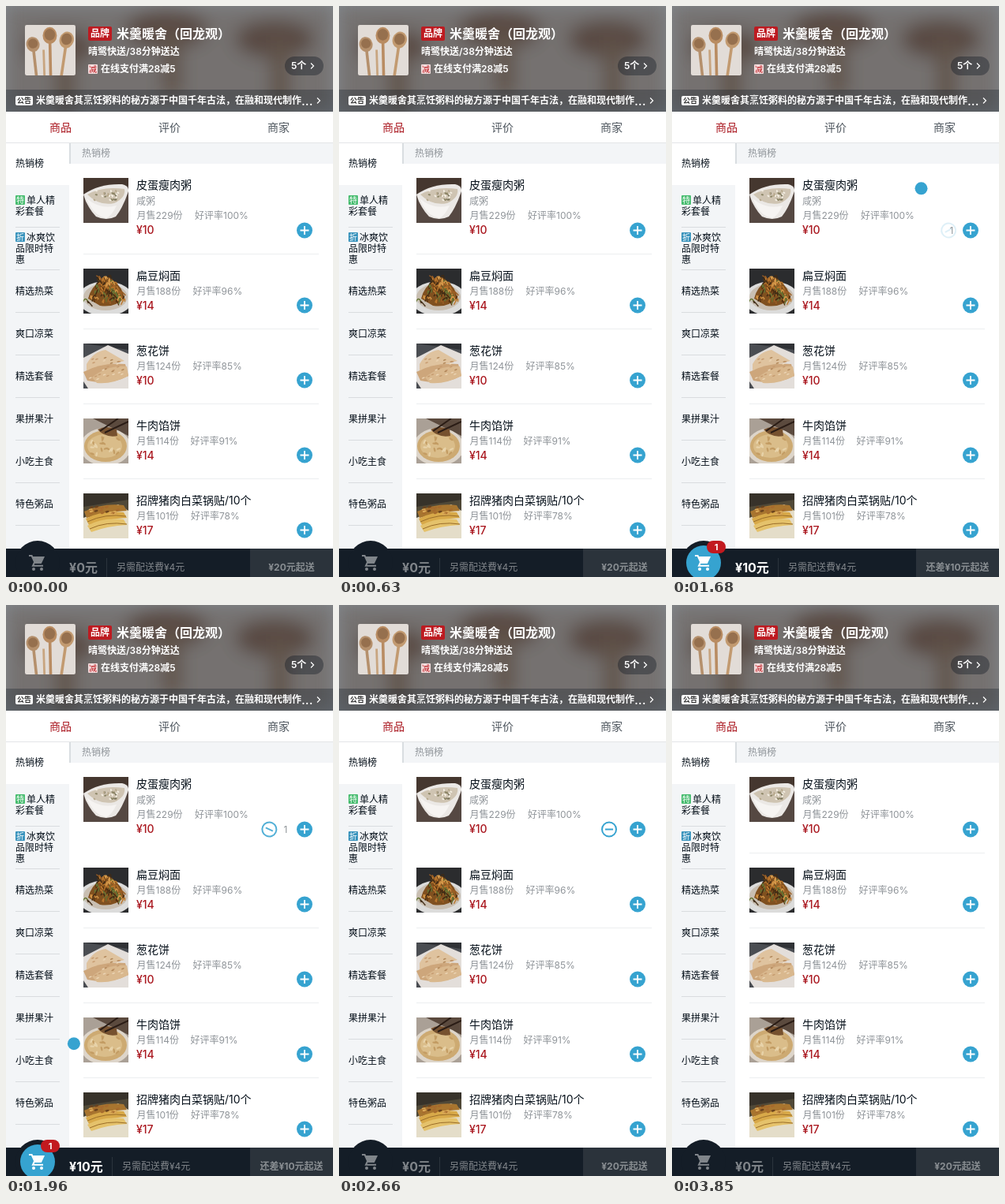
Recreate the animation shown at these times as an HTML page. Size 414 by 724 pixels, loop 3920 ms.

```html
<!DOCTYPE html>
<html lang="zh-CN">
<head>
<meta charset="utf-8">
<style>
  html, body { margin: 0; width: 100%; height: 100%; overflow: hidden; background: #fff; }
  svg { display: block; width: 414px; height: 724px; font-family: Inter, "Noto Sans CJK SC", "Noto Sans CJK", sans-serif; }
</style>
</head>
<body>
<svg id="stage" viewBox="0 0 414 724"></svg>
<script>
const BLUE = '#36a3d0', RED = '#aa1820', TAG_RED = '#bd1a20', INK = '#07111b', GREY = '#8f9499', DIM = '#80858a';
const LOOP = 3920, STEP = 70, ADD = 1610, REMOVE = 2660, DURATION = 400, RENDER_DELAY = 6;

// y is the vertical centre of the line
const text = (x, y, size, fill, content, weight = 400, anchor = 'start') =>
  `<text x="${x}" y="${y + size * .37}" font-size="${size}" fill="${fill}" font-weight="${weight}" text-anchor="${anchor}">${content}</text>`;
const rect = (x, y, w, h, fill, r = 0) =>
  `<rect x="${x}" y="${y}" width="${w}" height="${h}" rx="${r}" fill="${fill}"/>`;
const ellipse = (x, y, rx, ry, fill, turn = 0) =>
  `<ellipse cx="${x}" cy="${y}" rx="${rx}" ry="${ry}" fill="${fill}" transform="rotate(${turn} ${x} ${y})"/>`;
const shape = (d, fill) => `<path d="${d}" fill="${fill}"/>`;
const stroke = (d, color, width = 1) => `<path d="${d}" fill="none" stroke="${color}" stroke-width="${width}"/>`;
const chevron = (x, y) => stroke(`M${x - 2} ${y - 3.5}l3.5 3.5l-3.5 3.5`, '#fff', 1.2);
const tag = (x, y, fill, content, color = '#fff') =>
  rect(x, y, 12, 12, fill, 1) + text(x + 6, y + 6, 10, color, content, 500, 'middle');

let seed = 7;
const random = () => (seed = seed * 16807 % 2147483647) / 2147483647;
const scatter = (count, draw) => Array.from({ length: count }, draw).join('');
const pick = list => list[Math.floor(random() * list.length)];

// Pictures use a 57 x 57 box
const photo = (x, y, size, content) =>
  `<svg x="${x}" y="${y}" width="${size}" height="${size}" viewBox="0 0 57 57">${content}</svg>`;

const spoon = (x, y, rx, ry, turn, endX, color) =>
  stroke(`M${x} ${y}L${endX} 58`, color, 3.2) + ellipse(x, y, rx, ry, color, turn) +
  ellipse(x, y - 1, rx - 2, ry - 3, '#96704e', turn);
const spoons = spoon(9, 22, 7.5, 8.5, -12, 13, '#b5906c') + stroke('M21 28L22 58', '#c8a580', 2.5) +
  spoon(28, 12, 8, 9.5, 0, 29, '#b98c62') + spoon(47, 17, 8, 9.5, 18, 41, '#c29a70');

const porridge = () => rect(0, 0, 57, 57, '#554842') + shape('M0 0H57V10L0 20Z', '#45372f') +
  shape('M0 21Q20 7 49 8Q58 10 57 17Q50 38 41 49Q29 55 16 49Q4 36 0 21Z', '#ebe8e5') +
  shape('M5 21Q24 10 52 14Q54 25 39 32Q20 36 5 21Z', '#cfc4b2') +
  scatter(28, () => ellipse(14 + random() * 30, 16 + random() * 13, 1.7, 1, pick(['#8b8465', '#b6a88c', '#f4efe3', '#77725a']), random() * 180)) +
  shape('M4 26Q22 41 42 35Q36 48 29 51Q13 49 4 26Z', '#f6f4f2');

const noodles = () => rect(0, 0, 57, 57, '#2b2c2e') + ellipse(28, 38, 35, 22, '#dcdcdb') + ellipse(28, 36, 28, 17, '#c9bfb2') +
  shape('M6 38Q9 24 22 15Q30 6 38 15Q49 23 52 37Q40 50 21 47Z', '#80501f') +
  scatter(80, () => {
    const y = 13 + random() * 31, x = 29 + (random() - .5) * (y + 5);
    return stroke(`M${x} ${y}q${random() * 10 - 5} ${-5 - random() * 5} ${random() * 14 - 7} ${random() * 10 - 5}`,
      pick(['#bb782e', '#d79b4c', '#54300f', '#9c5f25', '#3f2a14', '#667333']), 1.4);
  });

const flatbread = () => rect(0, 0, 57, 57, '#4a4d52') + shape('M0 0H57V8Z', '#303236') +
  shape('M0 18L31 2L57 13V57H6L0 48Z', '#e3deda') +
  shape('M4 26Q13 10 28 8L52 22Q33 27 4 34Z', '#dfc39f') +
  shape('M0 36Q24 23 53 26L57 41Q34 53 5 47Z', '#cda67b') +
  shape('M11 43Q30 27 55 29L57 41Q36 52 17 50Z', '#d9b88e') +
  scatter(26, () => ellipse(8 + random() * 42, 18 + random() * 28, 2, .8, pick(['#b1875a', '#c69b70', '#ebd4b4']), -20));

const meatPie = () => rect(0, 0, 57, 57, '#aaa096') + shape('M12 0H57V22Z', '#5b4a3e') +
  ellipse(28, 36, 32, 24, '#ddd5ca') + ellipse(28, 35, 27, 20, '#cdaa72') + ellipse(27, 35, 22, 15, '#dabd8a') +
  shape('M18 14Q29 8 42 14L43 22Q28 25 18 14Z', '#76512f') +
  scatter(20, () => ellipse(10 + random() * 36, 25 + random() * 21, 3, 1.2, pick(['#c39c63', '#e8d3aa']), random() * 180)) +
  stroke('M21 16L44 0M27 18L57 4', '#2a1c15', 2);

const dumplings = () => rect(0, 0, 57, 57, '#504938') + shape('M0 0H57V8L0 17Z', '#37322a') +
  shape('M0 31L44 14L57 22V57H0Z', '#e4ddc9') +
  [0, 1, 2].map(i => shape(`M${1 + i * 2} ${23 + i * 9}Q24 ${12 + i * 9} 51 ${15 + i * 9}L55 ${22 + i * 9}Q31 ${23 + i * 9} ${4 + i * 3} ${31 + i * 9}Z`,
    ['#a8752f', '#d8a949', '#e5c26b'][i])).join('') +
  scatter(22, () => ellipse(9 + random() * 38, 17 + random() * 10, 2.6, 1.3, pick(['#6b431e', '#a66a2d', '#d9a856']), -15)) +
  stroke('M5 36Q28 25 54 29M8 45Q29 35 55 39', '#9a6d2a', 1);

const foods = [
  { y: 218, name: '皮蛋瘦肉粥', note: '咸粥', sold: 229, rating: 100, ratingX: 239, price: 10, picture: porridge },
  { y: 333, name: '扁豆焖面', sold: 188, rating: 96, ratingX: 236.5, price: 14, picture: noodles },
  { y: 428, name: '葱花饼', sold: 124, rating: 85, ratingX: 236.5, price: 10, picture: flatbread },
  { y: 523, name: '牛肉馅饼', sold: 114, rating: 91, ratingX: 233.5, price: 14, picture: meatPie },
  { y: 618, name: '招牌猪肉白菜锅贴/10个', sold: 101, rating: 78, ratingX: 234, price: 17, picture: dumplings },
];

function header() {
  const blots = [[68, 52, 45, 22], [203, 30, 52, 24], [340, 42, 50, 24]]
    .map(([x, y, rx, ry]) => ellipse(x, y, rx, ry, '#594a42') + rect(x - 5, y, 24, 84, '#61534a')).join('');
  return `<defs><filter id="blur" x="-20%" y="-40%" width="140%" height="180%"><feGaussianBlur stdDeviation="11"/></filter>
      <clipPath id="top">${rect(0, 0, 414, 134)}</clipPath></defs>
    <g clip-path="url(#top)">${rect(0, 0, 414, 134, '#83888d')}
    <g filter="url(#blur)">${rect(0, 0, 414, 134, '#747170')}${blots}</g>
    ${rect(0, 106, 414, 28, 'rgba(7,17,27,.28)')}</g>` +
    photo(24, 24, 64, rect(0, 0, 57, 57, '#e2dcd7', 2) + spoons) +
    rect(104, 26, 30, 18, TAG_RED, 2) + text(119, 35, 12, '#fff', '品牌', 700, 'middle') +
    text(140, 35, 16, '#fff', '米羹暖舍（回龙观）', 700) +
    text(104, 58, 12, '#fff', '晴鹭快送/38分钟送达', 600) +
    tag(104, 74, '#f3dcdc', '减', TAG_RED) + text(120, 80, 12, '#fff', '在线支付满28减5', 600) +
    rect(353, 64, 49, 24, 'rgba(7,17,27,.35)', 12) + text(361, 76, 12, '#fff', '5个', 600) + chevron(388, 76) +
    rect(12, 114, 22, 12, '#fff', 2) + text(23, 120, 9, '#333', '公告', 700, 'middle') +
    text(38, 120, 12, '#fff', '米羹暖舍其烹饪粥料的秘方源于中国千年古法，在融和现代制作', 600) +
    text(374, 120, 16, '#fff', '...', 500) + chevron(396, 120) +
    text(69, 154, 14, RED, '商品', 400, 'middle') + text(207, 154, 14, '#4d555d', '评价', 400, 'middle') +
    text(345, 154, 14, '#4d555d', '商家', 400, 'middle') + rect(0, 173, 414, 1, '#e3e5e7');
}

function menu() {
  const labels = ['精选热菜', '爽口凉菜', '精选套餐', '果拼果汁', '小吃主食', '特色粥品'];
  let out = rect(0, 174, 80, 514, '#f3f5f7') + rect(0, 174, 80, 53, '#fff') + text(12, 200, 12, INK, '热销榜') +
    tag(12, 240, '#48bd70', '特') + text(26, 247, 12, INK, '单人精') + text(12, 261, 12, INK, '彩套餐') +
    tag(12, 287, '#3a94bd', '折') + text(26, 294, 12, INK, '冰爽饮') + text(12, 308, 12, INK, '品限时特') + text(12, 322, 12, INK, '惠');
  labels.forEach((label, i) => out += text(12, 362 + i * 54, 12, INK, label));
  for (let i = 0; i < 8; i++) out += rect(12, 280 + i * 54, 56, 1, '#d9dcdf');
  return out;
}

function food({ y, name, note, sold, rating, ratingX, price, picture }, index) {
  const shift = note ? 19 : 0, plusY = y + 47 + shift + (note ? .5 : -.5);
  return photo(98, y, 57, picture()) + text(165, y + 9, 14, INK, name) +
    (note ? text(165, y + 30, 12, GREY, note) : '') +
    text(165.5, y + 29 + shift, 12, GREY, `月售${sold}份`) + text(ratingX, y + 29 + shift, 12, GREY, `好评率${rating}%`) +
    text(165, y + 47 + shift, 14, RED, `¥${price}`, 500) +
    ellipse(378, plusY, 10, 10, BLUE) + stroke(`M372.5 ${plusY}h11M378 ${plusY - 5.5}v11`, '#fff', 1.8) +
    (index < 4 ? `<g id="divider${index}">${rect(98, y + 76 + shift + (note ? 1 : 0), 298, 1, '#eceef0')}</g>` : '');
}

function cartBar(active) {
  const price = active ? 10 : 0, divider = active ? 134 : 127, color = active ? '#fff' : DIM;
  return rect(0, 688, 414, 36, '#141d27') + ellipse(40, 706, 28, 28, '#141d27') +
    (active ? ellipse(40, 706, 22, 22, BLUE) : '') +
    `<g transform="translate(28 694)">${stroke('M1 3H4.6L8.2 11L6 15.8H19', color, 2)}${shape('M5 4H21L16.8 13H8.2Z', color)}
      ${ellipse(7, 20, 2, 2, color)}${ellipse(17, 20, 2, 2, color)}</g>` +
    (active ? rect(44, 678, 24, 16, '#c2191f', 8) + text(56, 686, 11, '#fff', '1', 700, 'middle') : '') +
    text(80, 712, 16, color, `¥${price}元`, 700) + rect(divider, 700, 1, 24, '#2b343d') +
    text(divider + 13, 712, 12, DIM, '另需配送費¥4元') +
    rect(309, 688, 105, 36, '#2b333b') +
    text(361.5, 712, 12, '#898e92', active ? '还差¥10元起送' : '¥20元起送', 700, 'middle');
}

const minusButton = (x, turn, opacity) =>
  `<g transform="translate(${x} 284.5) rotate(${turn})" opacity="${opacity}">
    <circle r="9" fill="none" stroke="${BLUE}" stroke-width="2"/>${stroke('M-5 0H5', BLUE, 2)}</g>`;

const cubic = (a, b, s) => 3 * a * s * (1 - s) ** 2 + 3 * b * s * s * (1 - s) + s ** 3;
function tossEase(p) {
  let low = 0, high = 1;
  for (let i = 0; i < 24; i++) {
    const mid = (low + high) / 2;
    if (cubic(.49, .75, mid) < p) low = mid; else high = mid;
  }
  return cubic(-.29, .41, low);
}

function controls(time) {
  if (time >= ADD && time < REMOVE) {
    const raw = Math.max(0, (time - ADD - RENDER_DELAY) / DURATION), p = Math.min(1, raw);
    return minusButton(330 + 24 * (1 - p), 180 * (1 - p), p) +
      text(354, 285, 12, GREY, '1', 400, 'middle') +
      (raw < 1 ? ellipse(368 - 328 * p, 259 + 443 * tossEase(p), 8, 8, BLUE) : '');
  }
  const p = (time - REMOVE) / DURATION;
  return p >= 0 && p < 1 ? minusButton(342 + 24 * p, 180 * p, 1 - p) : '';
}

const stage = document.getElementById('stage');
stage.innerHTML = header() + menu() +
  rect(80, 174, 334, 26, '#f3f5f7') + rect(80, 174, 2, 26, '#d9dde1') + text(96, 187, 12, GREY, '热销榜') +
  foods.map(food).join('') + '<g id="cart"></g><g id="controls"></g>';
const [cart, controlLayer, firstDivider] = ['cart', 'controls', 'divider0'].map(id => document.getElementById(id));

const start = performance.now();
function draw() {
  const time = Math.floor((performance.now() - start) % LOOP / STEP) * STEP;
  const shown = controls(time);
  cart.innerHTML = cartBar(time >= ADD && time < REMOVE);
  controlLayer.innerHTML = shown;
  // The first divider is hidden while its row has extra controls
  firstDivider.setAttribute('visibility', shown ? 'hidden' : 'visible');
  requestAnimationFrame(draw);
}
draw();
</script>
</body>
</html>
```
